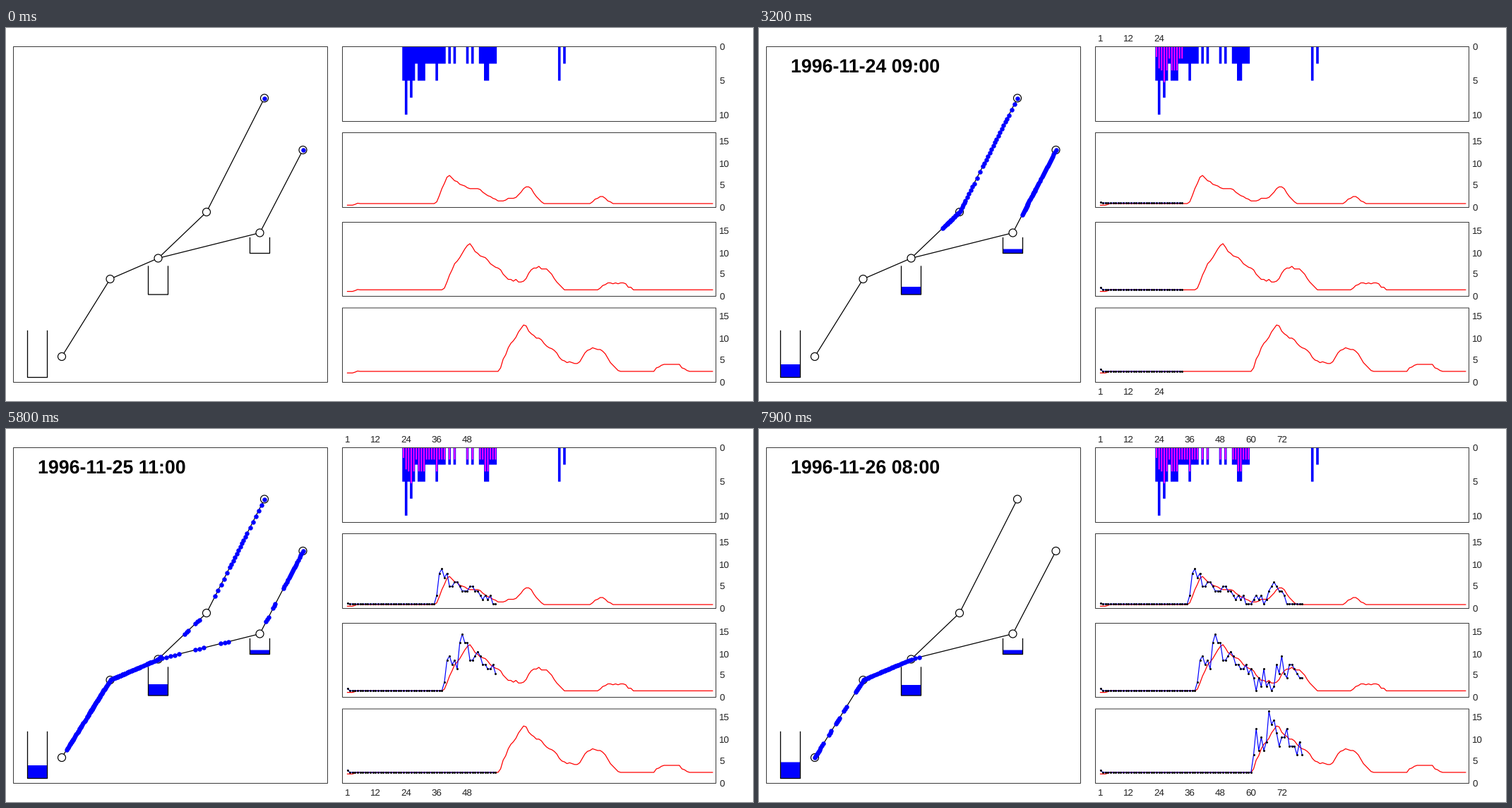
Write a matplotlib script that moves like this. It is 1058 by 529 pixels and loops after 8000 ms.

```python
import numpy as np
import matplotlib.pyplot as plt
from matplotlib.animation import FuncAnimation
from matplotlib.patches import Circle, Rectangle

W, H = 1058, 529
FRAMES, INTERVAL = 80, 100
PX = 0.72  # points per pixel at 100 dpi
HOURS = np.arange(1, 145)
BLUE = "#0000ff"

plt.rcParams.update({"font.family": "Liberation Sans",
                     "text.hinting": "none", "path.snap": False})
fig = plt.figure(figsize=(W / 100, H / 100), dpi=100, facecolor="white")
ax = fig.add_axes([0, 0, 1, 1])
ax.set_xlim(0, W)
ax.set_ylim(H, 0)
ax.axis("off")


def hour_x(hour):
    return 483.5 + (np.asarray(hour) - 1) * 3.617


def frame_box(x0, y0, x1, y1):
    ax.add_patch(Rectangle((x0, y0), x1 - x0, y1 - y0, fill=False,
                           ec="#3a3a3a", lw=PX, zorder=6))


def label(x, y, text, ha="left"):
    return ax.text(x, y, text, fontsize=13.4 * PX, color="#222222",
                   ha=ha, va="center_baseline")


# Rainfall depth per hour
rain = np.zeros(145)
rain[23:40] = 2.5
rain[[41, 43, 48, 50, 86]] = 2.5
rain[53:60] = 2.5
rain[[23, 25, 27, 29, 30, 31, 36, 55, 56, 84]] = 5
rain[26] = 7.5
rain[24] = 10
net_rain = 0.7 * rain
net_rain[23:25] = 1.5, 3.2

# River network: each route has its corners and the travel steps to reach them
A, B, C, D, E = (366, 99.5), (284, 261), (215.5, 326.5), (147.5, 356), (79, 466)
F, G = (420.5, 173), (359.5, 290.5)
ROUTES = [
    (np.array([A, B, C, D, E]), [0, 20, 46.5, 74.5, 111]),
    (np.array([F, G, C, D, E]), [0, 37.5, 62, 90, 126.5]),
]

# Every rainy hour releases one parcel per unit of depth, spread over 3 steps
release = np.concatenate([
    3 * r + 3 - 3 * np.arange(n) / n
    for r, n in enumerate(np.floor(rain + 0.5).astype(int)) if n])


def crossings(*stations):
    """Parcels that passed the given stations during each hour."""
    total = np.zeros(len(HOURS))
    for station in stations:
        for i, hour in enumerate(HOURS):
            steps = 3 * hour - release
            total[i] += np.sum((steps > station + 1e-6)
                               & (steps - 3 <= station + 1e-6))
    return total


def observed(count, base):
    """Five hour running mean with a short warm-up dip."""
    mean = np.convolve(count, np.ones(5) / 5)[:len(count)] + base
    mean[:5] += -0.36, -0.36, -0.36, -0.18, 0.08
    return mean


# Network drawing
for path in ((A, B, C, D, E), (F, G, C)):
    ax.plot(*zip(*path), color="black", lw=1.25 * PX, zorder=1)
for node in (A, B, C, D, E, F, G):
    ax.add_patch(Circle(node, 5.5, fc="white", ec="black", lw=1.2 * PX,
                        zorder=2))
parcels, = ax.plot([], [], "o", ms=6.5 * PX, color=BLUE, mew=0, zorder=3)
frame_box(10.5, 26.5, 455.5, 502.5)
clock = ax.text(45, 53.5, "", fontsize=26.8 * PX, weight="bold",
                color="black", va="center_baseline")


class Tank:
    def __init__(self, x, top, bottom, values, heights):
        self.bottom, self.values, self.heights = bottom, values, heights
        self.fill = Rectangle((x, bottom), 28, 0, fc=BLUE, lw=0, zorder=2)
        ax.add_patch(self.fill)
        ax.plot([x, x, x + 28, x + 28], [top, bottom, bottom, top],
                color="black", lw=1.3 * PX, zorder=3)

    def set(self, value):
        height = np.interp(value, self.values, self.heights)
        self.fill.set_y(self.bottom - height)
        self.fill.set_height(height)


class Chart:
    def __init__(self, top, bottom, count, base, red_base, first, tank):
        self.bottom, self.unit = bottom, (bottom - top) / 17
        self.flow = count + base
        self.flow[0] = first
        self.tank = tank
        frame_box(476.5, top, 1005.5, bottom)
        for v in (0, 5, 10, 15):
            label(1010, self.y(v), str(v))
        ax.plot(hour_x(HOURS), self.y(observed(count, red_base)), color="red",
                lw=1.25 * PX, zorder=3)
        self.line, = ax.plot([], [], "-o", color=BLUE, lw=1.2 * PX,
                             ms=3 * PX, mfc="black", mec="black", mew=0,
                             zorder=4)

    def y(self, value):
        return self.bottom - self.unit * np.asarray(value)

    def set(self, hour):
        self.line.set_data(hour_x(HOURS[:hour]), self.y(self.flow[:hour]))
        self.tank.fill.set_visible(hour > 0)
        if hour:
            self.tank.set(self.flow[hour - 1])


charts = [
    Chart(148.5, 254.5, crossings(37.5), 1, 0.88, 1.15,
          Tank(345.5, 297.5, 319.5, [1, 9], [6, 22])),
    Chart(275.5, 380.5, crossings(46.5, 62), 1.5, 1.48, 2,
          Tank(201.5, 338, 378, [1.5, 4.5, 6.5, 9.5, 12.5, 14.5],
               [11, 15, 17, 21, 29.5, 33])),
    Chart(397, 502.5, crossings(111, 126.5), 2.5, 2.5, 3,
          Tank(30.5, 429.5, 495.5, [2.5, 6.5, 10.5, 16.5],
               [18.5, 23, 25.5, 31])),
]

# Rain panel, with depth growing downwards
RAIN_TOP, RAIN_UNIT = 26.5, 106 / 11
frame_box(476.5, RAIN_TOP, 1005.5, 132.5)
for v in (0, 5, 10):
    label(1010, RAIN_TOP + v * RAIN_UNIT, str(v))
ax.stairs(RAIN_TOP + RAIN_UNIT * rain, hour_x(np.arange(146) - 0.5),
          baseline=RAIN_TOP, fill=True, color=BLUE, lw=0, zorder=2)
ax.set_xlim(0, W)
ax.set_ylim(H, 0)

net_bars = []
for hour in np.flatnonzero(rain):
    bar = Rectangle((hour_x(hour) - 1, RAIN_TOP), 2,
                    net_rain[hour] * RAIN_UNIT, fc="#ff00ff", lw=0, zorder=3)
    ax.add_patch(bar)
    net_bars.append((hour, bar))

hour_labels = [(t, label(hour_x(t), y, str(t), "center"))
               for t in (1, 12, 24, 36, 48, 60, 72) for y in (14, 515.5)]


def parcel_points(hour):
    if hour < 24:
        return np.array([A, F])
    steps = 3 * hour - release
    points = []
    for corners, stations in ROUTES:
        s = steps[(steps >= -1e-6) & (steps <= stations[-1] + 0.5)]
        points.append(np.column_stack(
            [np.interp(s, stations, corners[:, k]) for k in (0, 1)]))
    return np.vstack(points)


def update(frame):
    hour = frame + 1 if frame else 0
    parcels.set_data(*parcel_points(hour).T)
    for chart in charts:
        chart.set(hour)
    for start, bar in net_bars:
        bar.set_visible(start <= hour)
    for start, text in hour_labels:
        text.set_visible(start <= hour)
    day = 23 + int(hour / 24 + 0.5)
    clock.set_text(f"1996-11-{day} {hour % 24:02d}:00" if hour else "")
    return []


anim = FuncAnimation(fig, update, frames=FRAMES, interval=INTERVAL,
                     init_func=lambda: update(0), repeat=True, repeat_delay=0)
plt.show()
```
